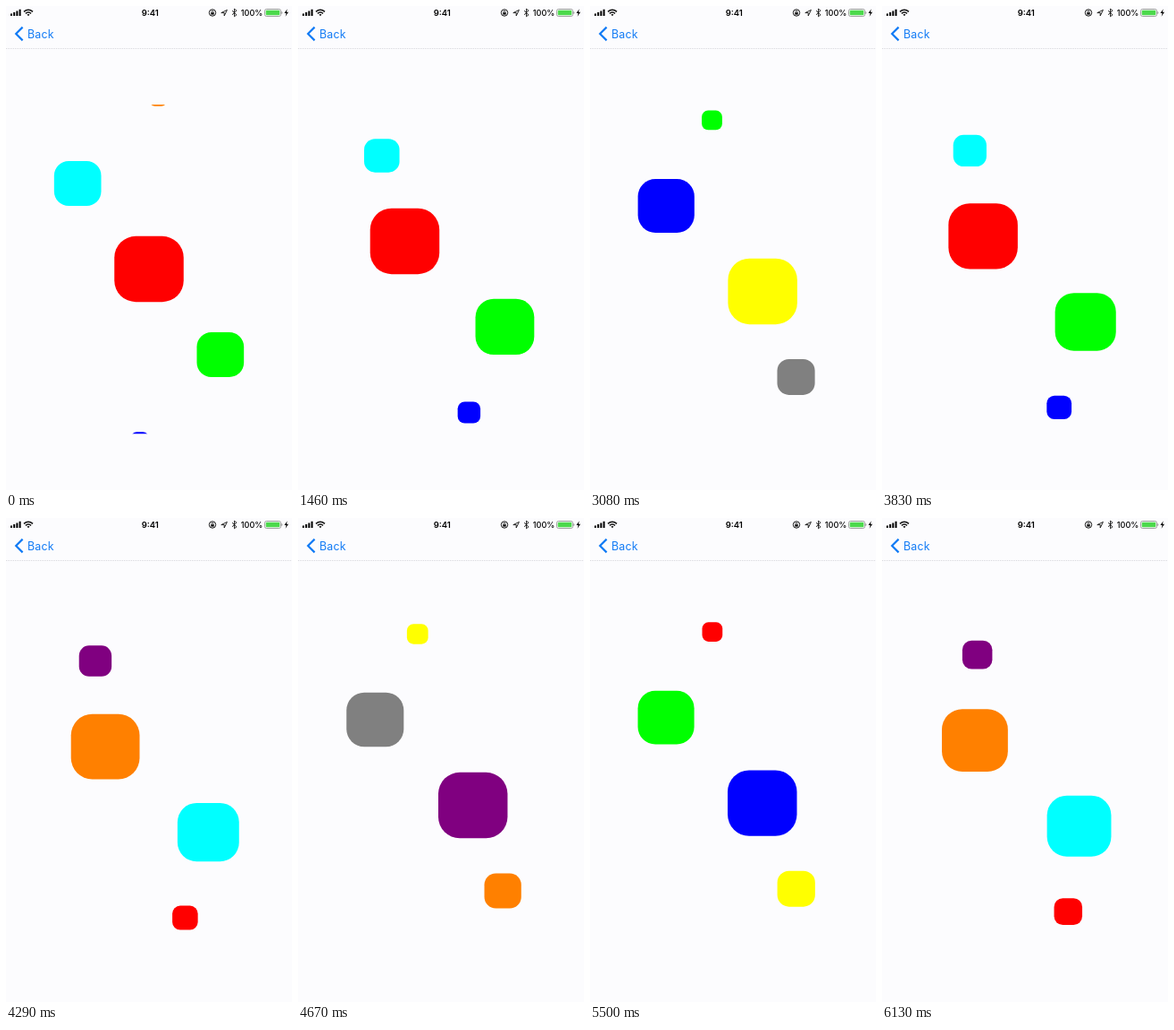
These frames come from a looping animation (320x540 px, 6.18 s). An HTML page:

```html
<!DOCTYPE html>
<html lang="en">
<head>
<meta charset="utf-8">
<title>Wave carousel</title>
<style>
  html, body { margin: 0; height: 100%; overflow: hidden; background: #fcfcfe; }
  svg { display: block; width: 100vw; height: 100vh; }
  text { font-family: Inter, Roboto, sans-serif; }
  .line { fill: none; stroke: #111; stroke-width: 1; }
</style>
</head>
<body>
<svg viewBox="0 0 320 540">
  <clipPath id="viewport"><rect y="110" width="320" height="367.2"/></clipPath>

  <!-- status bar -->
  <path d="M5 8.5h2v2.5h-2zM8.2 7h2v4h-2zM11.4 5.5h2v5.5h-2zM14.6 3.8h2v7.2h-2z"/>
  <g class="line">
    <path d="M20 6.4q5-4.4 10 0" stroke-width="1.5"/>
    <path d="M21.9 8.4q3.1-2.7 6.2 0" stroke-width="1.5"/>
  </g>
  <path d="M23.5 9.6q1.5-1.2 3 0l-1.5 1.6z"/>
  <text x="161.3" y="11" font-size="9.5" font-weight="600" text-anchor="middle">9:41</text>
  <circle class="line" cx="231" cy="7.5" r="3.7"/>
  <path d="M229.3 7.2h3.4v2.4h-3.4z"/>
  <path class="line" d="M230 7.2v-.8a1 1 0 0 1 2 0v.8" style="stroke-width:.7"/>
  <path class="line" d="M240.8 7.6l6.6-3.2-3.2 6.6v-3.4z" style="stroke-width:.9"/>
  <path class="line" d="M253 5.2l5 4.6-2.5 2v-8.6l2.5 2-5 4.6" style="stroke-width:.9"/>
  <text x="287.3" y="11" font-size="9.1" font-weight="500" text-anchor="end">100%</text>
  <rect x="289.5" y="3.5" width="18" height="8" rx="2" fill="none" stroke="#8c8c8c" stroke-width=".8"/>
  <rect x="290.7" y="4.7" width="15.6" height="5.6" rx="1" fill="#4cd94c"/>
  <path d="M308.4 6v3q1-.4 1-1.5t-1-1.5z" fill="#8c8c8c"/>
  <path d="M314.8 3.2l-3.4 4.9h2.2l-1 3.6 3.4-5h-2.2z"/>

  <!-- navigation bar -->
  <path d="M18.6 23.6l-7.4 7.4 7.4 7.4" fill="none" stroke="#127bf5" stroke-width="2.2"/>
  <text x="24" y="35.5" font-size="12.4" letter-spacing=".2" fill="#127bf5">Back</text>
  <path d="M0 47.5h320" stroke="#cfcfd3" stroke-width=".8" stroke-dasharray="1 1"/>

  <g id="cells" clip-path="url(#viewport)"></g>
</svg>

<script>
const LOOP = 6180, STEPS_PER_MS = 0.024;
const CENTER_X = 160, CENTER_Y = 293.5, HALF = 183.5, SPACING = 95.5;
const WIDTH = 77.5, HEIGHT = 73.4, RADIUS = 24;
const COLORS = ['#0ff', '#f00', '#0f0', '#00f', '#ff0', '#808080', '#800080', '#ff8000'];

// Scroll position over time: [step, index of the centred cell]
const SCROLL = [
  [25, 1], [35, 1.325], [56, 3.463], [67, 4.3], [92, 1.383],
  [112, -2.283], [132, -5.258], [144, -8.1], [147, -8.525]
];

const slope = (a, b) => (b[1] - a[1]) / (b[0] - a[0]);
const tangents = SCROLL.map((point, i) =>
  i === 0 ? 0 : slope(SCROLL[i - 1], SCROLL[i + 1] || point));

function scrollAt(step) {
  const last = SCROLL.length - 1;
  if (step <= SCROLL[0][0]) return SCROLL[0][1];
  if (step >= SCROLL[last][0]) return SCROLL[last][1];
  const i = SCROLL.findIndex(point => point[0] > step) - 1;
  const [s0, p0] = SCROLL[i], [s1, p1] = SCROLL[i + 1];
  const span = s1 - s0, u = (step - s0) / span, v = 1 - u;
  return p0 * v * v * (1 + 2 * u) + p1 * u * u * (3 - 2 * u)
    + span * u * v * (tangents[i] * v - tangents[i + 1] * u);
}

const layer = document.getElementById('cells');
const cells = Array.from({ length: 7 }, () =>
  layer.appendChild(document.createElementNS('http://www.w3.org/2000/svg', 'rect')));

function placeCell(cell, index, scroll) {
  const d = (index - scroll) * SPACING;
  const scale = Math.min(1, Math.max(0.25, 1.2 - Math.abs(d) / HALF));
  const x = CENTER_X + 80 * Math.sin(Math.PI * d / HALF);
  const w = WIDTH * scale, h = HEIGHT * scale;
  const attributes = {
    x: x - w / 2, y: CENTER_Y + d - h / 2, width: w, height: h,
    rx: RADIUS * scale, fill: COLORS[(index % 8 + 8) % 8]
  };
  for (const name in attributes) cell.setAttribute(name, attributes[name]);
}

function draw(now) {
  const step = Math.floor((now % LOOP + 4) * STEPS_PER_MS);
  const scroll = scrollAt(step);
  const first = Math.round(scroll) - 3;
  cells.forEach((cell, i) => placeCell(cell, first + i, scroll));
}

const start = performance.now();
function tick() {
  draw(performance.now() - start);
  requestAnimationFrame(tick);
}
tick();
</script>
</body>
</html>
```
